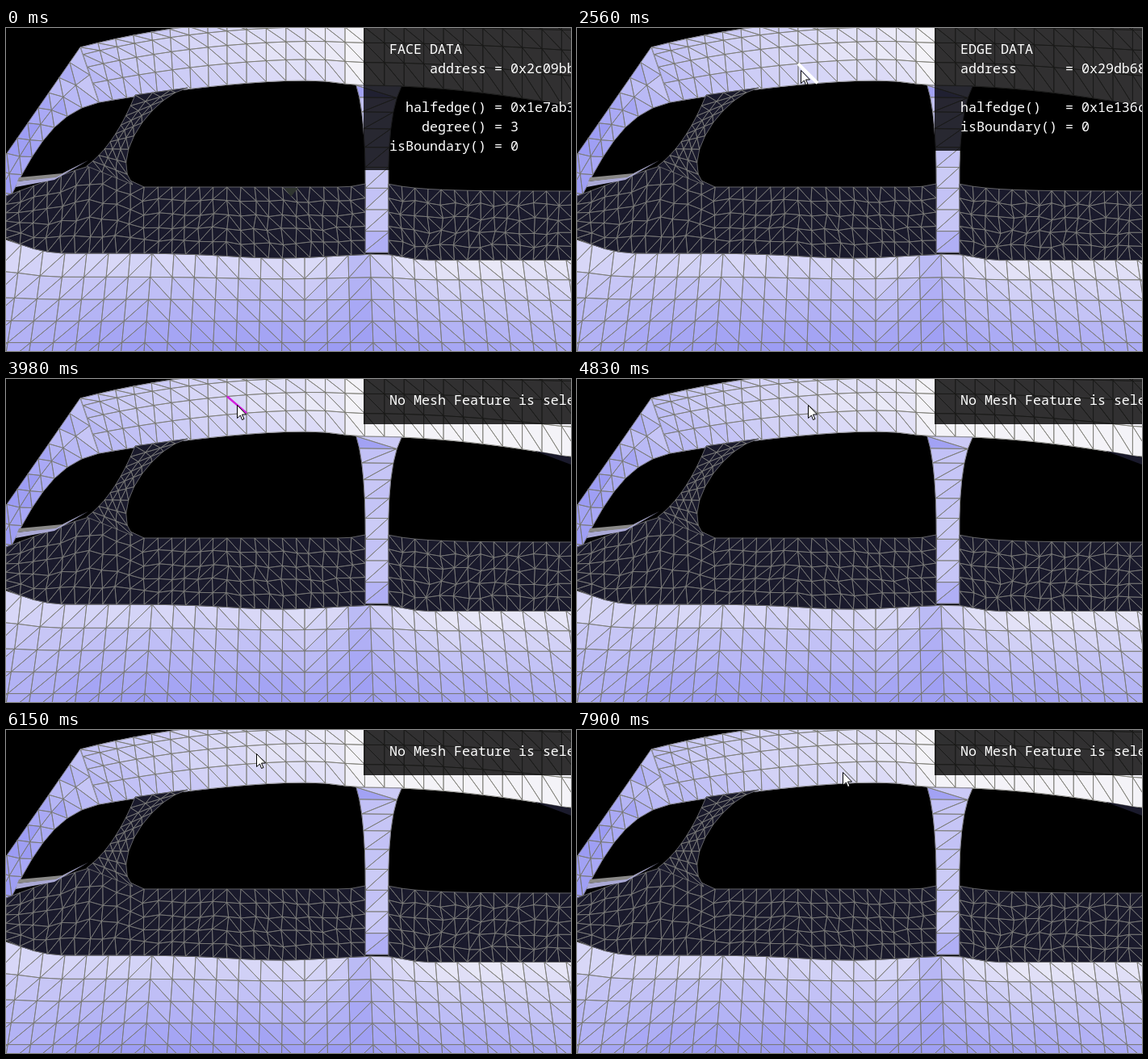
Animation, 700 px wide and 400 px high, one loop 7990 ms. Source, as an HTML page with a canvas:

```html
<!DOCTYPE html>
<html lang="en">
<head>
<meta charset="utf-8">
<title>Mesh feature picker</title>
<style>
  html, body { margin: 0; width: 100%; height: 100%; overflow: hidden; background: #000; }
  canvas { display: block; }
</style>
</head>
<body>
<canvas id="stage" width="700" height="400"></canvas>
<script>
const LOOP = 7990, STEP = 46;
const ctx = document.getElementById('stage').getContext('2d');
const scene = document.createElement('canvas');
scene.width = 700;
scene.height = 400;
const g = scene.getContext('2d');

const clamp = v => Math.max(0, Math.min(1, v));
const mix = (a, b, t) => a + (b - a) * t;
const mixPoint = (p, q, t) => [mix(p[0], q[0], t), mix(p[1], q[1], t)];
const bell = (x, center, width) => Math.exp(-(((x - center) / width) ** 2));
const noise = (i, j) => {
  const n = Math.sin(i * 12.9898 + j * 78.233) * 43758.5453;
  return n - Math.floor(n);
};

// Bezier point for any number of control points.
function bezier(points, u) {
  while (points.length > 1) points = points.slice(1).map((p, k) => mixPoint(points[k], p, u));
  return points[0];
}

function polygon(c, points, fill, stroke) {
  c.beginPath();
  points.forEach(p => c.lineTo(...p));
  c.closePath();
  c.fillStyle = fill;
  c.fill();
  if (stroke) { c.strokeStyle = stroke; c.stroke(); }
}

// Body outlines as heights over x.
const roofEdge = x => x < 434
  ? 65 + 27 * Math.abs((365 - x) / 250) ** 1.6 + 3 * clamp((x - 405) / 29)
  : 71 + 26 * clamp((x - 450) / 250) ** 1.8;
const roofTop = x => -12 + 36 * clamp((434 - x) / 342) ** 2.5;
const sill = x => 279 - 19 * clamp(1 - x / 75) ** 2 + 6 * bell(x, 340, 90) + 8.5 * clamp((x - 470) / 45);
const beltLeft = x => x < 100 ? 208 - .37 * x
  : 171 + 26 * clamp((x - 100) / 65) ** 2 - 4 * clamp((x - 415) / 30) ** 2;
const beltRight = x => 202 - 9 * Math.exp((473 - x) / 40);

function roofVertex(i, j) {
  const k = i - 9, left = Math.min(k, 0), level = 1 - (1 - j / 4) ** 1.45;
  const x = 298 + 24.4 * k + .457 * left ** 2 - 23 * level * (left / 9) ** 2;
  return [x, mix(roofEdge(x), roofTop(x), level)];
}

const strip = (a, b, cols, rows) => (i, j) =>
  mixPoint(bezier(a, i / cols), bezier(b, i / cols), j / rows);

// Grid between two heights with slightly scattered inner vertices.
const band = (x0, x1, top, cols, rows, scatter) => (i, j) => {
  const inner = i > 0 && i < cols && j > 0 && j < rows ? scatter : 0;
  const x = mix(x0, x1, i / cols) + inner * (noise(i, j) - .5);
  return [x, mix(top(x), sill(x), j / rows) + inner * (noise(j, i) - .5)];
};

function mesh(cols, rows, at, shade, flip, line = '#77776f') {
  const wires = new Path2D();
  for (let j = 0; j < rows; j++) for (let i = 0; i < cols; i++) {
    const a = at(i, j), b = at(i + 1, j), c = at(i + 1, j + 1), d = at(i, j + 1);
    const faces = flip(i, j) ? [[a, b, d], [b, c, d]] : [[a, b, c], [a, c, d]];
    faces.forEach((face, n) => {
      const [x, y] = [0, 1].map(m => (face[0][m] + face[1][m] + face[2][m]) / 3);
      const color = shade(x, y, noise(i * 2 + n, j) - .5);
      polygon(g, face, color, color);
      wires.moveTo(...face[2]);
      face.forEach(p => wires.lineTo(...p));
    });
  }
  g.strokeStyle = line;
  g.lineWidth = .75;
  g.stroke(wires);
}

const paint = t => {
  t = clamp(t);
  return `rgb(${mix(156, 244, t)},${mix(156, 243, t)},${mix(244, 248, t)})`;
};
const roofShade = (x, y, n) =>
  paint(.42 + .5 * clamp((x - 80) / 350) + .12 * clamp((x - 410) / 30) - .1 * clamp((y - 40) / 20) * (x < 420) + n * .1);
const bodyShade = (x, y, n) => {
  const depth = clamp((y - 285) / 112);
  const top = .7 + .12 * bell(x, 360, 60) + .28 * clamp((x - 460) / 80) - .35 * bell(x, 438, 22);
  const sides = .18 * depth * (clamp(1 - x / 130) + clamp((x - 440) / 260));
  return paint(mix(top, .02, depth ** .85) + sides + n * .06);
};
const navy = () => '#1a1a2c';

function drawScene() {
  g.fillStyle = '#000';
  g.fillRect(0, 0, 700, 400);

  mesh(27, 4, roofVertex, roofShade, () => true);
  mesh(28, 5, (i, j) => {
    const x = 370 + 27 * (i - 14) * (1 + .012 * j);
    return [x, 284 + 26.4 * j + (sill(x) - 284) * (1 - j / 5) ** 4];
  }, bodyShade, i => i < 7 || i >= 14 && i < 17);

  // Windscreen pillar, then door pillar
  mesh(8, 2, strip([[-12, 174], [92, 24]], [[-6, 232], [30, 160], [55, 105], [115, 92]], 8, 2),
    (x, y, n) => paint(.05 + .35 * clamp((x - 25) / 80) + n * .25), () => false);
  mesh(9, 1, strip([[434, 71], [447, 110], [447, 200], [443, 278]],
    [[490, 72], [470, 110], [472, 200], [477, 278]], 9, 1),
    (x, y, n) => paint(.48 - .35 * (y < 92) * (x < 460) - .25 * (y > 255) + n * .12), i => i > 0);

  const wire = '#7c7c7a';
  mesh(26, 5, band(0, 445, beltLeft, 26, 5, 4), navy, i => i < 16, wire);
  mesh(14, 5, band(474, 702, beltRight, 14, 5, 5), navy, (i, j) => noise(i, j) > .5, wire);
  mesh(9, 3, strip([[100, 171], [135, 145], [160, 83]],
    [[157, 194], [128, 160], [180, 85], [225, 74]], 9, 3), navy, () => true, wire);
  polygon(g, [[655, 89], [700, 97], [700, 106]], navy());

  // Mirror sliver
  polygon(g, [[14, 190], [62, 184], [102, 164], [60, 188], [12, 197]], '#aaa9d6');
  polygon(g, [[16, 185], [70, 180], [101, 164], [62, 185], [14, 190]], '#898887');
}

// Picked roof edges: column, row, hover from, picked at, released at
const picks = [
  [8, 1, 1960, 2560, 3220],
  [8, 2, 3890, 4460, 4830],
  [9, 2, 5380, 5880, 6150],
  [9, 1, 6730, 7240, 7510]
];

// Cursor moves: start, end, target, easing power
const moves = [
  [780, 930, [416, 75], 1],
  [1080, 1310, [322, 75], 2.2],
  [1540, 2050, [277, 52], 1],
  [3520, 3980, [286, 32], 1],
  [5010, 5470, [310, 29], 1],
  [6390, 6770, [310, 52], 1],
  [7740, 7900, [329, 52], 1]
];

function cursorAt(t) {
  let pos = [655, 466];
  for (const [start, end, target, power] of moves) {
    if (t < start) break;
    const steps = Math.round((end - start) / STEP) + 1;
    const done = 1 + Math.floor(clamp((t - start) / (end - start)) * (steps - 1) + 1e-6);
    pos = mixPoint(pos, target, (done / steps) ** power);
  }
  return pos;
}

function drawEdge(i, j, color, width) {
  ctx.strokeStyle = color;
  ctx.lineWidth = width;
  ctx.beginPath();
  ctx.moveTo(...roofVertex(i, j));
  ctx.lineTo(...roofVertex(i + 1, j - 1));
  ctx.stroke();
}

function drawPanel(...lines) {
  ctx.fillStyle = 'rgba(0,0,0,.8)';
  ctx.fillRect(443, 0, 257, 32 + lines.length * 24);
  ctx.fillStyle = '#fff';
  ctx.font = '16.67px "Noto Sans Mono", monospace';
  lines.forEach((line, i) => ctx.fillText(line, 475, 32 + i * 24));
}

function drawCursor([x, y]) {
  const arrow = [[0, 0], [0, 16], [4, 12.5], [6, 18], [8.5, 17], [6, 11.5], [11, 11.5]];
  ctx.lineWidth = 1;
  polygon(ctx, arrow.map(p => [Math.round(x) + p[0] + .5, Math.round(y) + p[1] + .5]), '#fff', '#000');
}

function render(t) {
  ctx.drawImage(scene, 0, 0);
  const active = picks.find(p => t >= p[2] && t < p[4]);
  const picked = active && t >= active[3];
  if (active) drawEdge(active[0], active[1], picked ? '#fff' : '#d21fdc', picked ? 4 : 2.6);

  if (t < picks[0][3]) {
    polygon(ctx, [[345, 198], [362, 198], [353, 209]], '#2f3530');
    drawPanel('FACE DATA', '     address = 0x2c09bb', '', '  halfedge() = 0x1e7ab3',
      '    degree() = 3', 'isBoundary() = 0');
  } else if (picked) {
    drawPanel('EDGE DATA', 'address      = 0x29db68', '', 'halfedge()   = 0x1e136c', 'isBoundary() = 0');
  } else {
    drawPanel('No Mesh Feature is selected');
  }
  if (t >= moves[0][0]) drawCursor(cursorAt(t));
}

drawScene();
const begin = performance.now();
function tick() {
  render((performance.now() - begin) % LOOP);
  requestAnimationFrame(tick);
}
tick();
</script>
</body>
</html>
```
